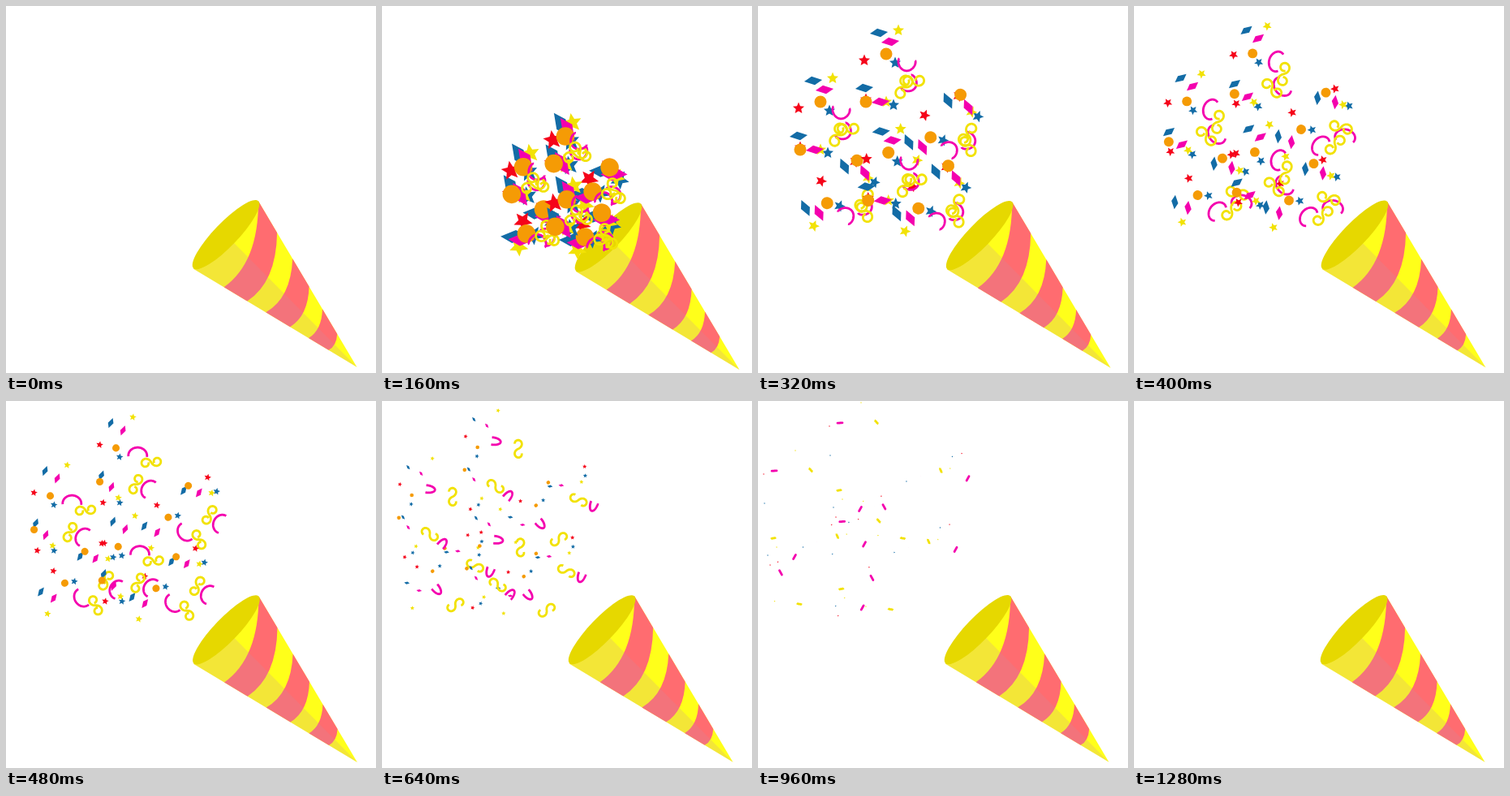
An HTML page with a canvas for the animation above (1400 ms loop, 456 px wide and 452 px high).

```html
<!DOCTYPE html>
<html lang="en">
<head>
<meta charset="utf-8">
<title>Party popper</title>
<style>
  html, body { margin: 0; width: 100%; height: 100%; overflow: hidden; background: #fff; }
  canvas { display: block; width: 456px; height: 452px; }
</style>
</head>
<body>
<canvas id="stage"></canvas>
<script>
const W = 456, H = 452, LOOP = 1400, STEP = 40, END = 1280;
const BLAST = 250, BEAT = 160;
const canvas = document.getElementById('stage');
const ctx = canvas.getContext('2d');
const dpr = window.devicePixelRatio || 1;
canvas.width = W * dpr;
canvas.height = H * dpr;

const RED = '#f5041a', YELLOW = '#f2e205', BLUE = '#136ca6', PINK = '#f400ae', ORANGE = '#f59b05';
const rad = d => d * Math.PI / 180;
const mix = (a, b, k) => a + (b - a) * k;
const clamp = (x, lo = 0, hi = 1) => Math.min(hi, Math.max(lo, x));

const shrink = t => Math.max(0, 1.45 - .0014 * t) ** 2;
const spin = t => rad(125 - .39 * t);
const tumble = t => 209 * (1 - .545 ** ((t - 3 * BEAT) / BEAT));
const stub = t => Math.min(6, (END - t) / 53);

function fill(points, color) {
  ctx.beginPath();
  for (const [x, y] of points) ctx.lineTo(x, y);
  ctx.fillStyle = color;
  ctx.fill();
}

function star(t, color) {
  const r = 7.4 * Math.exp(-.0031 * (t - 320)), points = [];
  for (let i = 0; i < 10; i++) {
    const q = i % 2 ? r * .46 : r, a = spin(t) - Math.PI / 2 + i * Math.PI / 5;
    points.push([q * Math.cos(a), q * Math.sin(a)]);
  }
  fill(points, color);
}

function kite(t, color) {
  const k = shrink(t);
  ctx.rotate(spin(t));
  ctx.scale(k, k);
  fill([[-11, 1], [-2, -5.2], [11, -1], [2, 5.2]], color);
}

function dot(t, color) {
  ctx.beginPath();
  ctx.arc(0, 0, 7.5 * shrink(t), 0, 2 * Math.PI);
  ctx.fillStyle = color;
  ctx.fill();
}

// Strokes a curve, point(u) with u in [-1, 1], centred on its mean
function ribbon(point, color) {
  const n = 60, points = [];
  for (let i = 0; i <= n; i++) points.push(point(2 * i / n - 1));
  const mean = k => points.reduce((sum, p) => sum + p[k], 0) / points.length;
  const mx = mean(0), my = mean(1);
  ctx.beginPath();
  for (const [x, y] of points) ctx.lineTo(x - mx, y - my);
  ctx.strokeStyle = color;
  ctx.lineWidth = 2.8;
  ctx.lineJoin = 'round';
  ctx.stroke();
}

// A loop that opens to an arch, narrows to a U and ends as a dash
function hook(t, color, tilt) {
  const n = (t - 3 * BEAT) / BEAT, early = clamp(-n);
  const span = 1.7 + 1.3 * early;
  const half = mix(Math.max(11.5 - 7 * n, stub(t) / 2), 5, early);
  const depth = (10 - 3 * early) * clamp(3 - n);
  ctx.rotate(rad(tumble(t) + tilt - 88));
  ribbon(u => {
    const a = u * span;
    return [depth * Math.cos(a), half * Math.sin(a) + 3 * early * a];
  }, color);
}

// A figure eight that unwinds from both ends
function wave(t, color, tilt) {
  const len = clamp(64 - .12 * (t - 3 * BEAT), stub(t), 78);
  const bend = Math.min(6.2, len * .1);
  let x = 0, y = 0;
  ctx.rotate(rad(tumble(t) + tilt + 60));
  ribbon(u => {
    const a = -bend * Math.abs(u) ** 1.3;
    x += Math.cos(a) * len / 60;
    y += Math.sin(a) * len / 60;
    return [x, y];
  }, color);
}

// Shape, colour, place after the blast, drift from there
const LOW = [
  [star, BLUE, 167, 122, -74, 9],
  [star, RED, 133, 115, -37, 28],
  [star, YELLOW, 158, 118, -54, 3],
  [kite, BLUE, 131, 101, -37, -26],
  [kite, PINK, 151, 118, -58, -33],
  [dot, ORANGE, 133, 118, -48, -51],
  [hook, PINK, 188, 97, -62, 36],
  [wave, YELLOW, 180, 100, -80, 10]
];
const HIGH = [
  [star, BLUE, 169, 70, -80, -3],
  [star, RED, 131, 67, -43, -36],
  [star, YELLOW, 173, 30, -46, -28],
  [kite, BLUE, 149, 33, -55, -16],
  [kite, PINK, 163, 44, -52, -21],
  [dot, ORANGE, 158, 59, -62, -3],
  [hook, PINK, 183, 73, -82, -46],
  [wave, YELLOW, 190, 92, -44, -66]
];

// Shot from the mouth, bending past the hub, then a slowing drift
function travel(t, mouth, hub, place, drift, drag) {
  const glide = s => {
    const n = (s - 320) / 640;
    return place + drift * n * (1 + drag * (1 - n));
  };
  const bend = mix(place, hub, .43);
  if (t < BEAT) return mix(mouth, bend, t / BEAT);
  return t < BLAST ? mix(bend, glide(BLAST), (t - BEAT) / (BLAST - BEAT)) : glide(t);
}

function scatter(t, pieces, tilt) {
  for (const [draw, color, x, y, dx, dy] of pieces) {
    const drag = draw === hook || draw === wave ? 0 : .6;
    ctx.save();
    ctx.translate(travel(t, 246, 316, x, dx, drag), travel(t, 290, 295, y, dy, drag));
    draw(t, color, tilt);
    ctx.restore();
  }
}

function confetti(t) {
  const s = Math.min(1, t / BLAST);
  const c = Math.cos(rad(58)), d = Math.sin(rad(58));
  const copies = (offsets, mirrored) => {
    for (const [x, y] of offsets) {
      ctx.save();
      ctx.translate(x * s, y * s);
      if (mirrored) ctx.transform(c, d, d, -c, -130 + 209 * s, 234 - 175 * s);
      scatter(t, LOW, -58);
      scatter(t, HIGH, 0);
      ctx.restore();
    }
  };
  copies([[0, 0], [-127.5, 81], [-15, 87.5]], true);
  copies([[0, 0], [-81, 59], [2.7, 121.5]], false);
}

const TOP = [311, 240.3], LEFT = [230.7, 323.5], TIP = [432.5, 444.8], MID = [271, 281.7];
const toward = (a, b, k) => [mix(a[0], b[0], k), mix(a[1], b[1], k)];

// Band between two curves, each given by its distance along the upper and lower edge
function band(u1, l1, u2, l2) {
  const edge = (u, l) => {
    const a = toward(TOP, TIP, u), b = toward(LEFT, TIP, l);
    return [a, toward(toward(a, b, .5), TIP, .15), b];
  };
  const [a, b, c] = edge(u1, l1), [d, e, f] = edge(u2, l2);
  ctx.beginPath();
  ctx.moveTo(...a);
  ctx.quadraticCurveTo(...b, ...c);
  ctx.lineTo(...f);
  ctx.quadraticCurveTo(...e, ...d);
  ctx.fillStyle = '#ff6c70';
  ctx.fill();
}

function cone(t) {
  const recoil = .38 * t * Math.exp(-t / 79);
  ctx.save();
  ctx.translate(recoil, recoil * .4);
  fill([TOP, TIP, LEFT], '#ffff1a');
  band(0, .188, .19, .33);
  band(.347, .444, .515, .592);
  band(.65, .705, .8, .827);
  fill([MID, TIP, LEFT], 'rgba(198,141,160,.22)');
  ctx.beginPath();
  ctx.ellipse(...MID, 57.5, 14.6, rad(-46), 0, 2 * Math.PI);
  ctx.fillStyle = '#e6d800';
  ctx.fill();
  ctx.restore();
}

function render() {
  const t = Math.min(END, Math.floor(performance.now() % LOOP / STEP) * STEP);
  ctx.setTransform(dpr, 0, 0, dpr, 0, 0);
  ctx.fillStyle = '#fff';
  ctx.fillRect(0, 0, W, H);
  cone(t);
  if (t > 0 && t < END) confetti(t);
  requestAnimationFrame(render);
}
render();
</script>
</body>
</html>
```
